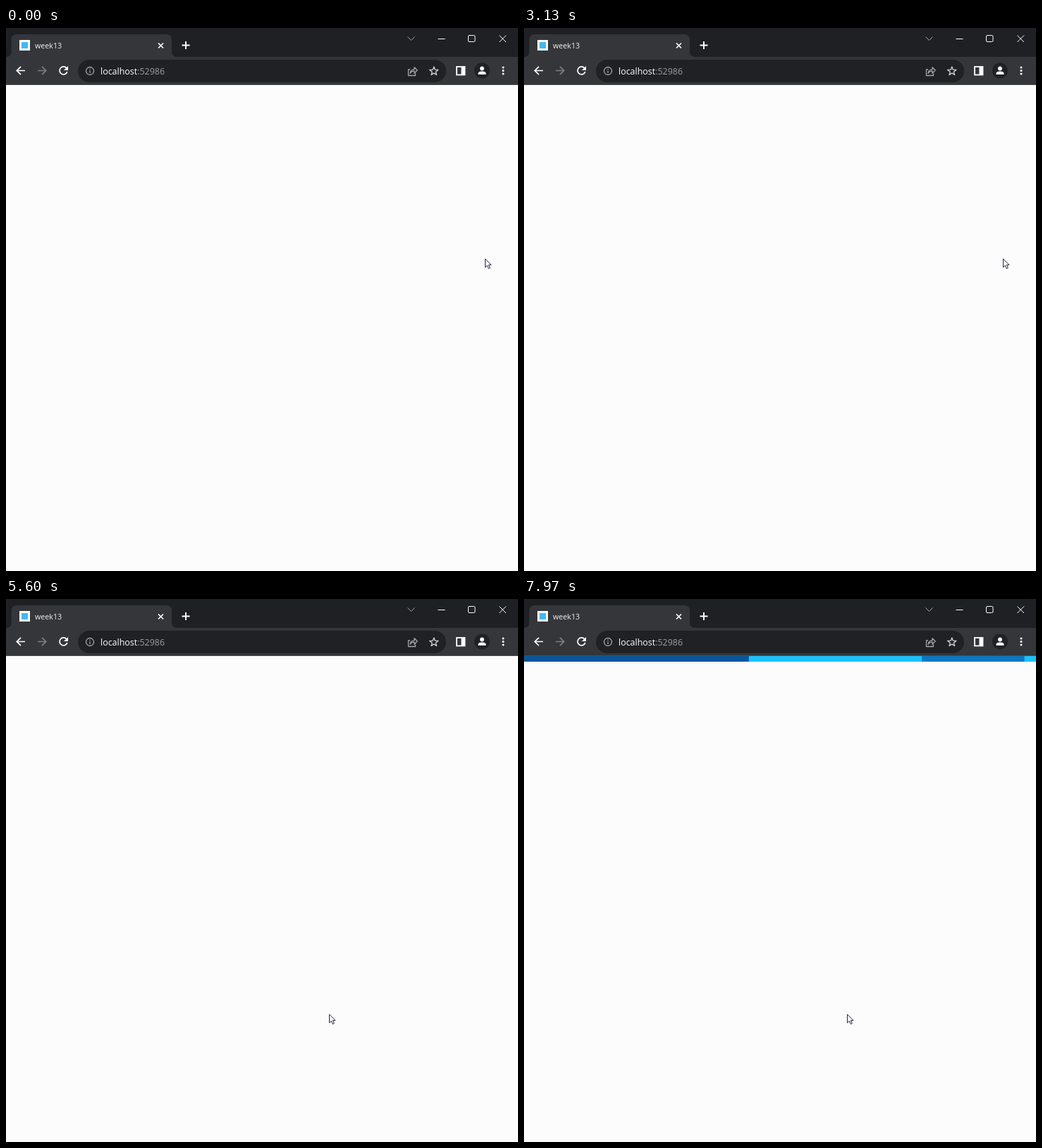
Recreate the animation shown at these times as an HTML page. Size 726 px wide and 771 px high, loop 8000 ms.

```html
<!DOCTYPE html>
<html lang="en">
<head>
<meta charset="utf-8">
<title>week13</title>
<style>
  html, body { margin: 0; width: 100%; height: 100%; overflow: hidden; background: #fcfcfc; }
  svg { display: block; width: 726px; height: 771px; }
  text { font-family: "Open Sans", sans-serif; }
  .line { fill: none; stroke: #fff; }
</style>
</head>
<body>
<svg viewBox="0 0 726 771">
  <rect width="726" height="771" fill="#fcfcfc"/>

  <!-- tab strip -->
  <rect width="726" height="41" fill="#1f2023"/>
  <path d="M0 41Q7.500 41 7.500 33V17Q7.500 9 15.500 9H227Q235 9 235 17V33Q235 41 243 41Z" fill="#35363a"/>
  <rect x="19" y="17" width="15" height="15" fill="#fff"/>
  <rect x="22" y="20" width="9" height="9" fill="#45b8f0"/>
  <text x="41" y="29" font-size="10.7" fill="#f1f3f4">week13</text>
  <path class="line" d="M216 21.500l7 7m0-7l-7 7" stroke-width="1.700"/>
  <path class="line" d="M249.500 24.500h11m-5.500-5.500v11" stroke-width="1.900"/>
  <path class="line" d="M569.500 12.500l5 5 5-5" stroke="#aaa" style="stroke:#a5a6a8"/>
  <path class="line" d="M612.500 15.500h10M699.500 10.500l9.500 9.500m0-9.500l-9.500 9.500"/>
  <rect class="line" x="655.500" y="10.500" width="9.500" height="9" rx="1.500"/>

  <!-- toolbar -->
  <rect y="41" width="726" height="40" fill="#35363a"/>
  <rect y="80" width="726" height="1" fill="#4b4c50"/>
  <rect x="102" y="45" width="522" height="32" rx="16" fill="#202124"/>
  <path id="arrow" class="line" d="M27 60.500H15.500M21 54.800l-5.700 5.700 5.700 5.700" stroke-width="1.700"/>
  <path class="line" d="M45 60.500h11.500M51 54.800l5.700 5.700-5.700 5.700" stroke-width="1.700" style="stroke:#7e7f82"/>
  <path class="line" d="M85.800 57A5.500 5.500 0 1 0 86.800 62" stroke-width="1.700"/>
  <path d="M88 54v6h-6z" fill="#fff"/>
  <g fill="none" stroke="#a3a7ab" stroke-width="1.300">
    <circle cx="119" cy="61" r="5.500"/>
    <path d="M119 60.300v3.700M119 57.800v1.300"/>
    <path d="M573 59h-2.500v8.500h10v-3M573 64.500q.6-5.500 6-5.700v-3l4.200 4.200-4.200 4.200v-3q-4-.2-6 3.300z" stroke-linejoin="round"/>
  </g>
  <text x="134" y="65.500" font-size="12.450" fill="#9aa0a6"><tspan fill="#fff">localhost</tspan>:52986</text>
  <path id="star" fill="none" stroke="#d5d7da" stroke-width="1.300" stroke-linejoin="round"/>
  <rect x="639" y="55" width="11.500" height="11.500" class="line" stroke-width="1.800"/>
  <rect x="645.500" y="55" width="5" height="11.500" fill="#fff"/>
  <circle cx="675" cy="60.500" r="11" fill="#202124"/>
  <circle cx="675" cy="57.500" r="2.900" fill="#fff"/>
  <path d="M669.500 66v-1.300q0-3.200 5.500-3.200t5.500 3.200V66z" fill="#fff"/>
  <g fill="#fff">
    <circle cx="705" cy="56" r="1.500"/><circle cx="705" cy="60.500" r="1.500"/><circle cx="705" cy="65" r="1.500"/>
  </g>

  <!-- page loader -->
  <g id="loader">
    <rect y="81" width="726" height="8" fill="#1bc1f8"/>
    <rect id="first" y="81" height="8" fill="#0a77c1"/>
    <rect id="second" y="81" height="8" fill="#07569a"/>
  </g>

  <path id="cursor" d="M.5.8V12.800L3.300 10.200 5.300 14.600 7.300 13.700 5.300 9.400H9Z" fill="#fff" stroke="#23233a" stroke-width="1"/>
</svg>
<script>
const LOOP = 8000, W = 726;
const $ = id => document.getElementById(id);
const loader = $("loader"), first = $("first"), second = $("second"), cursor = $("cursor");

const starPoints = Array.from({ length: 10 }, (_, i) => {
  const r = i % 2 ? 2.7 : 6.4, a = i * Math.PI / 5;
  return `${606.8 + r * Math.sin(a)} ${61.4 - r * Math.cos(a)}`;
});
$("star").setAttribute("d", `M${starPoints.join("L")}Z`);

// CSS cubic-bezier timing function
function bezier(x1, y1, x2, y2) {
  const at = (a, b, s) => 3 * a * s * (1 - s) ** 2 + 3 * b * s * s * (1 - s) + s ** 3;
  return x => {
    let lo = 0, hi = 1;
    for (let i = 0; i < 24; i++) {
      const mid = (lo + hi) / 2;
      if (at(x1, x2, mid) < x) lo = mid; else hi = mid;
    }
    return at(y1, y2, lo);
  };
}
const easeOut = bezier(0, 0, .58, 1), easeIn = bezier(.42, 0, 1, 1);

// time, x, y
const route = [[3600, 679, 327], [4140, 514, 467], [4960, 502, 494], [5520, 458, 589]];

function cursorAt(t) {
  if (t <= route[0][0]) return route[0].slice(1);
  for (let i = 1; i < route.length; i++) {
    const [t0, x0, y0] = route[i - 1], [t1, x1, y1] = route[i];
    if (t < t1) {
      const k = (t - t0) / (t1 - t0), e = k * k * (3 - 2 * k);
      return [Math.round(x0 + (x1 - x0) * e), Math.round(y0 + (y1 - y0) * e)];
    }
  }
  return route[route.length - 1].slice(1);
}

const SHOW = 7061, STALL = 7240, RESUME = 7500, STEP = 36, SPEED = 1.597, CYCLE = 2000;

function loaderPhase(t) {
  const shown = t < RESUME ? Math.min(t, STALL) : RESUME + Math.floor((t - RESUME) / STEP) * STEP;
  return (shown - SHOW) * SPEED / CYCLE % 1;
}

function placeBar(bar, from, p) {
  bar.setAttribute("x", W * (from + (1 - from) * p));
  bar.setAttribute("width", W * (1 - .9 * p));
}

function draw(t) {
  const [x, y] = cursorAt(t);
  cursor.setAttribute("transform", `translate(${x} ${y})`);
  const loading = t >= SHOW;
  loader.style.display = loading ? "" : "none";
  if (loading) {
    const p = loaderPhase(t);
    placeBar(first, -1, easeOut(p));
    placeBar(second, -1.5, easeIn(p));
  }
}

const start = performance.now();
function tick() {
  draw((performance.now() - start) % LOOP);
  requestAnimationFrame(tick);
}
tick();
</script>
</body>
</html>
```
